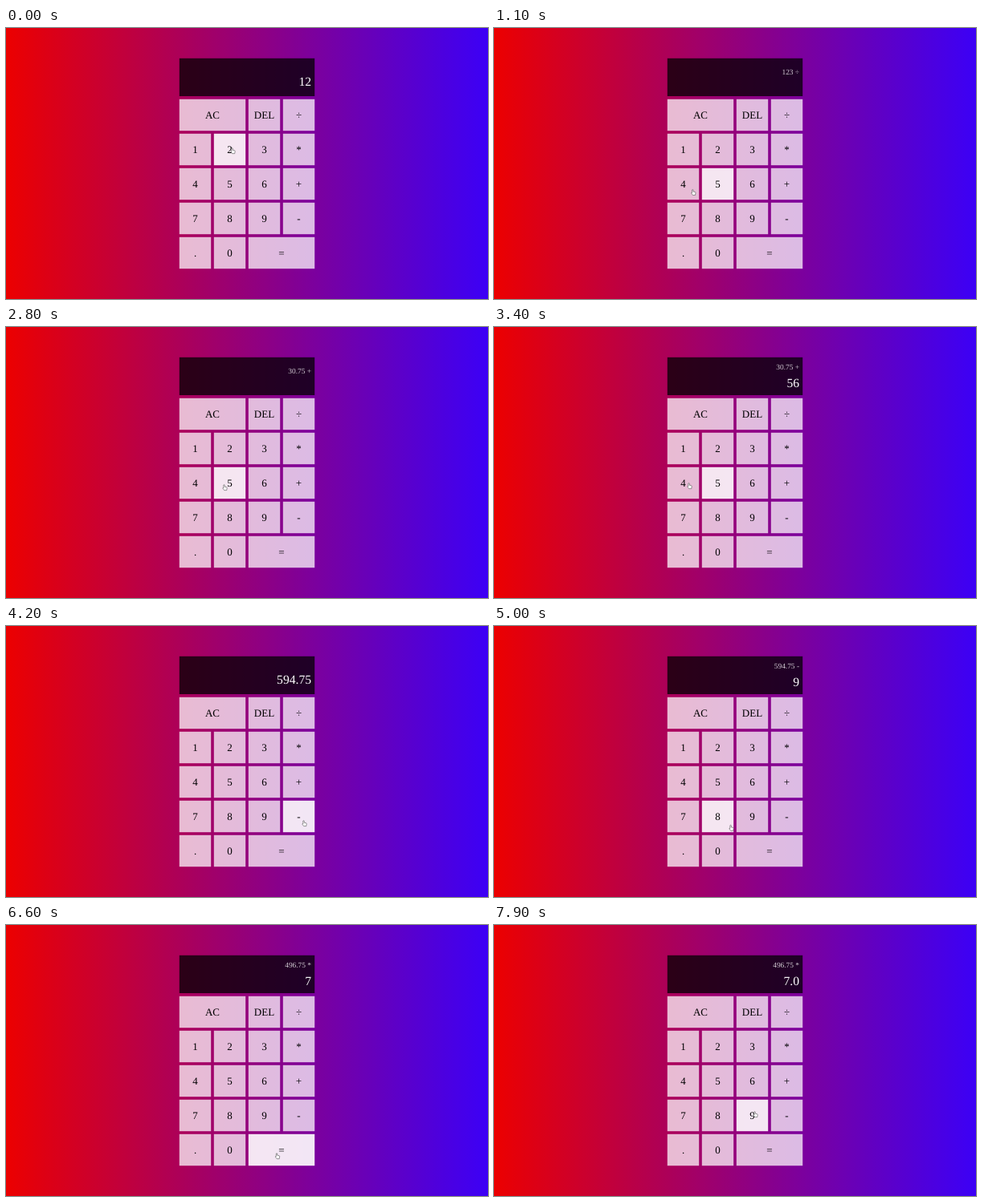
These frames come from a looping animation (600x338 px, 8 s). An HTML page:

```html
<!DOCTYPE html>
<html lang="en">
<head>
<meta charset="utf-8">
<title>Calculator</title>
<style>
  html, body { margin: 0; width: 100%; height: 100%; overflow: hidden; }
  svg { display: block; width: 600px; height: 338px; }
  text { font-family: "Liberation Serif", "Times New Roman", serif; text-rendering: geometricPrecision; }
  .key rect { fill: #fff; fill-opacity: .735; }
  .key.hover rect { fill-opacity: .9; }
  .key text { font-size: 13px; text-anchor: middle; }
  .out { text-anchor: end; fill: #fff; }
  #prev { font-size: 9.4px; fill-opacity: .8; }
  #cur { font-size: 15.6px; }
</style>
</head>
<body>
<svg viewBox="0 0 600 338">
  <defs>
    <linearGradient id="bg">
      <stop offset="0" stop-color="#ec0000"/>
      <stop offset="1" stop-color="#3c00f6"/>
    </linearGradient>
  </defs>
  <rect width="600" height="338" fill="url(#bg)"/>
  <rect x="215.8" y="37.8" width="168.4" height="47.2" fill-opacity=".75"/>
  <text id="prev" class="out" x="380"></text>
  <text id="cur" class="out" x="380"></text>
  <g id="keys"></g>
  <path id="hand" fill="#fff" stroke="#444" stroke-width=".65" stroke-linejoin="round"
    d="M-.8 .6Q0-.4 .8 .6V3.2L3.6 3.8Q4.4 4 4.3 5L3.8 8.4H.2L-2 5.5Q-2.2 4.3-.8 5Z"/>
</svg>
<script>
const NS = "http://www.w3.org/2000/svg";
const LOOP = 8000, STEP = 100;
const MOVE = 400;   // longest pointer travel
const LAG = 100;    // the page reacts this long after the pointer
const SIZE = 39, PITCH = 43, BLEED = .2;
const $ = id => document.getElementById(id);

function add(parent, tag, attrs, label) {
  const el = document.createElementNS(NS, tag);
  for (const name in attrs) el.setAttribute(name, attrs[name]);
  if (label) el.textContent = label;
  return parent.appendChild(el);
}

// "" marks a column covered by the wide key before it.
const rows = [["AC", "", "DEL", "÷"], ["1", "2", "3", "*"], ["4", "5", "6", "+"],
              ["7", "8", "9", "-"], [".", "0", "=", ""]];
const keys = {};
rows.forEach((row, r) => row.forEach((label, c) => {
  if (!label) return;
  const x = 216 + c * PITCH, y = 89 + r * PITCH;
  const w = row[c + 1] === "" ? SIZE + PITCH : SIZE;
  const el = add($("keys"), "g", { class: "key" });
  add(el, "rect", { x: x - BLEED, y: y - BLEED, width: w + 2 * BLEED, height: SIZE + 2 * BLEED });
  add(el, "text", { x: x + w / 2, y: y + 23.6 }, label);
  keys[label] = { x, y, w, el };
}));

// Runs of evenly spaced presses; dx, dy shift the first one off its key's centre.
const runs = [
  { at: -100, keys: "2", dx: 3, dy: -2 },
  { at: 400, gap: 400, keys: "3÷" },
  { at: 1200, gap: 530, keys: "4=+", dx: 4, dy: 13 },
  { at: 2800, gap: 350, keys: "564=", dx: -7, dy: 2 },
  { at: 4200, gap: 375, keys: "-98=", dx: 6, dy: 5 },
  { at: 5700, gap: 450, keys: "*7", dx: -7, dy: -14 },
  { at: 6600, keys: "=", dx: -6, dy: 4, hover: true },
  { at: 7030, gap: 430, keys: ".0" },
  { at: 7900, keys: "9", dx: 3, dy: -5 }
];
const stops = runs.flatMap(({ at, gap, keys: labels, dx = 0, dy = 0, hover }) =>
  [...labels].map((label, i) => {
    const k = keys[label];
    return {
      t: at + i * (gap || 0), label, hover,
      x: k.x + k.w / 2 + (i ? 0 : dx),
      y: k.y + SIZE / 2 + (i ? 0 : dy)
    };
  }));

// Rest on a key, then travel to the next with an ease-out.
function pointer(t) {
  const i = stops.findIndex(s => s.t > t);
  if (i < 0) return stops[stops.length - 1];
  const a = stops[Math.max(0, i - 1)], b = stops[i];
  const begin = Math.max(a.t, b.t - MOVE);
  const u = Math.max(0, (t - begin) / (b.t - begin));
  const e = 1 - (1 - u) ** 2;
  return { x: a.x + (b.x - a.x) * e, y: a.y + (b.y - a.y) * e };
}

const ops = {
  "÷": (a, b) => a / b,
  "*": (a, b) => a * b,
  "+": (a, b) => a + b,
  "-": (a, b) => a - b
};

function calculate(t) {
  let prev = "", op = "", cur = "1";
  for (const s of stops) {
    if (s.t > t) break;
    if (s.hover) continue;
    if (s.label in ops) [prev, op, cur] = [cur, s.label, ""];
    else if (s.label === "=") [prev, op, cur] = ["", "", String(ops[op](+prev, +cur))];
    else cur += s.label;
  }
  return [op && `${prev} ${op}`, cur];
}

function show(id, text, y) {
  $(id).textContent = text;
  $(id).setAttribute("y", y);
}

function draw(t) {
  const p = pointer(t), h = pointer(t - LAG);
  $("hand").setAttribute("transform", `translate(${p.x} ${p.y}) scale(.85)`);

  for (const k of Object.values(keys)) {
    const inside = h.x >= k.x && h.x < k.x + k.w && h.y >= k.y && h.y < k.y + SIZE;
    k.el.classList.toggle("hover", inside);
  }

  const [prev, cur] = calculate(t - LAG);
  const both = prev && cur;
  show("prev", prev, both ? 53 : 57.7);
  show("cur", cur, both ? 75 : 72);
}

const start = performance.now();
function tick() {
  const t = (performance.now() - start) % LOOP;
  draw(Math.floor(t / STEP) * STEP);
  requestAnimationFrame(tick);
}
tick();
</script>
</body>
</html>
```
